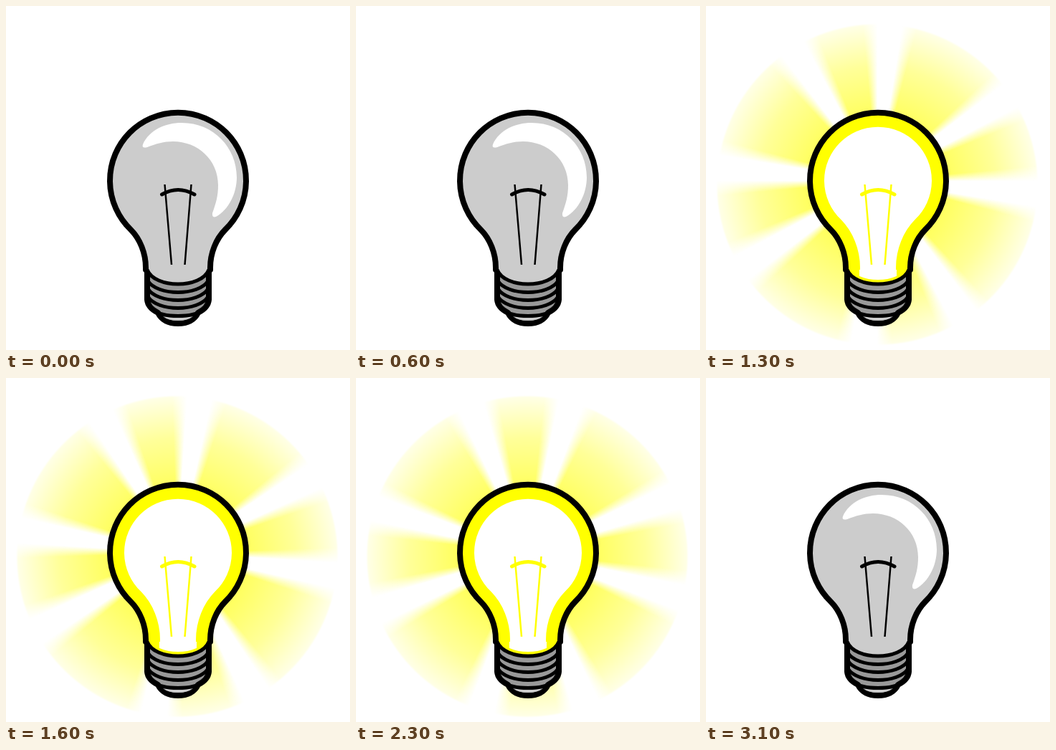
Animation of 480 by 480 pixels, one loop 3.5 s. Source, as an HTML page:

```html
<!DOCTYPE html>
<html lang="en">
<head>
<meta charset="utf-8">
<title>Light bulb</title>
<style>
  html, body { margin: 0; width: 100%; height: 100%; overflow: hidden; background: #fff; }
  #stage { position: relative; width: 480px; height: 480px; overflow: hidden; }
  #rays {
    --turn: 0deg;
    position: absolute; left: 14px; top: 24px; width: 450px; height: 450px;
    background: repeating-conic-gradient(from var(--turn) at 225px 220px,
      #ff00 0deg 4.5deg, #ff0 10deg 42.5deg, #ff00 48deg 57.5deg, #ff0 63deg 80deg, #ff00 85.5deg 90deg);
    --fade: radial-gradient(circle, rgba(0,0,0,.62) 100px, rgba(0,0,0,.4) 165px,
      rgba(0,0,0,.1) 222px, transparent 225px);
    -webkit-mask-image: var(--fade);
    mask-image: var(--fade);
  }
  svg { position: absolute; inset: 0; fill: none; stroke: #000; }
  .wire { stroke-linecap: round; }
  #stage:not(.on) .lit, .on .shine { display: none; }
  .glass { fill: #ccc; stroke: none; }
  .on .glass { fill: #fff; }
  .on .wire { stroke: #ff0; }
</style>
</head>
<body>
<div id="stage">
  <div id="rays" class="lit"></div>
  <svg width="480" height="480" viewBox="0 0 480 480">
    <defs>
      <path id="side" d="M195 368V365C195 345 187 325 174 312A95 95 0 1 1 306 312C293 325 285 345 285 365V368"/>
      <path id="rim" d="M197 368C207 394.7 273 394.7 283 368"/>
      <clipPath id="inside">
        <path d="M195 368V365C195 345 187 325 174 312A95 95 0 1 1 306 312C293 325 285 345 285 365V368C273 394.7 207 394.7 195 368Z"/>
      </clipPath>
    </defs>

    <path fill="#999" stroke-width="8" stroke-linejoin="round"
      d="M197 368V410Q198 421 212 428C217 438 227 443 240 443S263 438 268 428Q282 421 283 410V368Z"/>
    <path fill="#ccc" stroke="none" d="M219 433Q240 437 261 433Q254 439 240 439T219 433Z"/>
    <g id="thread" stroke-width="5"></g>

    <g clip-path="url(#inside)">
      <rect class="glass" x="140" y="140" width="200" height="260"/>
      <g class="lit" stroke="#ff0">
        <use href="#side" stroke-width="40"/>
        <path d="M195 365V392M285 365V392" stroke-width="38"/>
        <use href="#rim" stroke-width="12"/>
      </g>
    </g>
    <path class="shine" fill="#fff" stroke="none"
      d="M191 193C200 173 222 163 245 163C290 163 322 198 322 239C322 262 310 285 293 294Q287 296 288 289C293 275 296 265 296 250C296 215 268 189 233 189C220 189 210 192 197 197Q189 199 191 193Z"/>
    <path class="wire" style="stroke-linecap:butt" stroke-width="2.5" d="M221.5 249L231 361M258.5 249L249.5 361"/>
    <path class="wire" stroke-width="5" d="M217.5 263Q240 250 263 263"/>
    <use href="#rim" stroke-width="5"/>
    <use href="#side" stroke-width="8" stroke-linecap="round"/>
  </svg>
</div>
<script>
  const STEP = 100, LOOP = 3500, TURN = 1.16;
  const FIRST = 3, STEADY = 7, OFF = 31;
  const stage = document.getElementById('stage');
  const rays = document.getElementById('rays');

  document.getElementById('thread').innerHTML = [399.5, 410.5, 421.5, 432.5].map((y, i) => {
    const x = i === 3 ? 206 : 198;
    const edge = y - (i === 3 ? 8 : 16), dip = edge + (y - edge) * 4 / 3;
    return `<path d="M${x} ${edge}C${x + 13} ${dip} ${467 - x} ${dip} ${480 - x} ${edge}"/>`;
  }).join('');

  function draw(now) {
    const step = Math.floor(now % LOOP / STEP);
    // The bulb flickers on every other step until it burns steadily
    const flicker = (step - FIRST) % 2 === 0;
    const on = step >= FIRST && step < OFF && (step >= STEADY || flicker);
    stage.classList.toggle('on', on);
    rays.style.setProperty('--turn', (step - 9) * TURN + 'deg');
  }

  const start = performance.now();
  function tick() {
    draw(performance.now() - start);
    requestAnimationFrame(tick);
  }
  tick();
</script>
</body>
</html>
```
